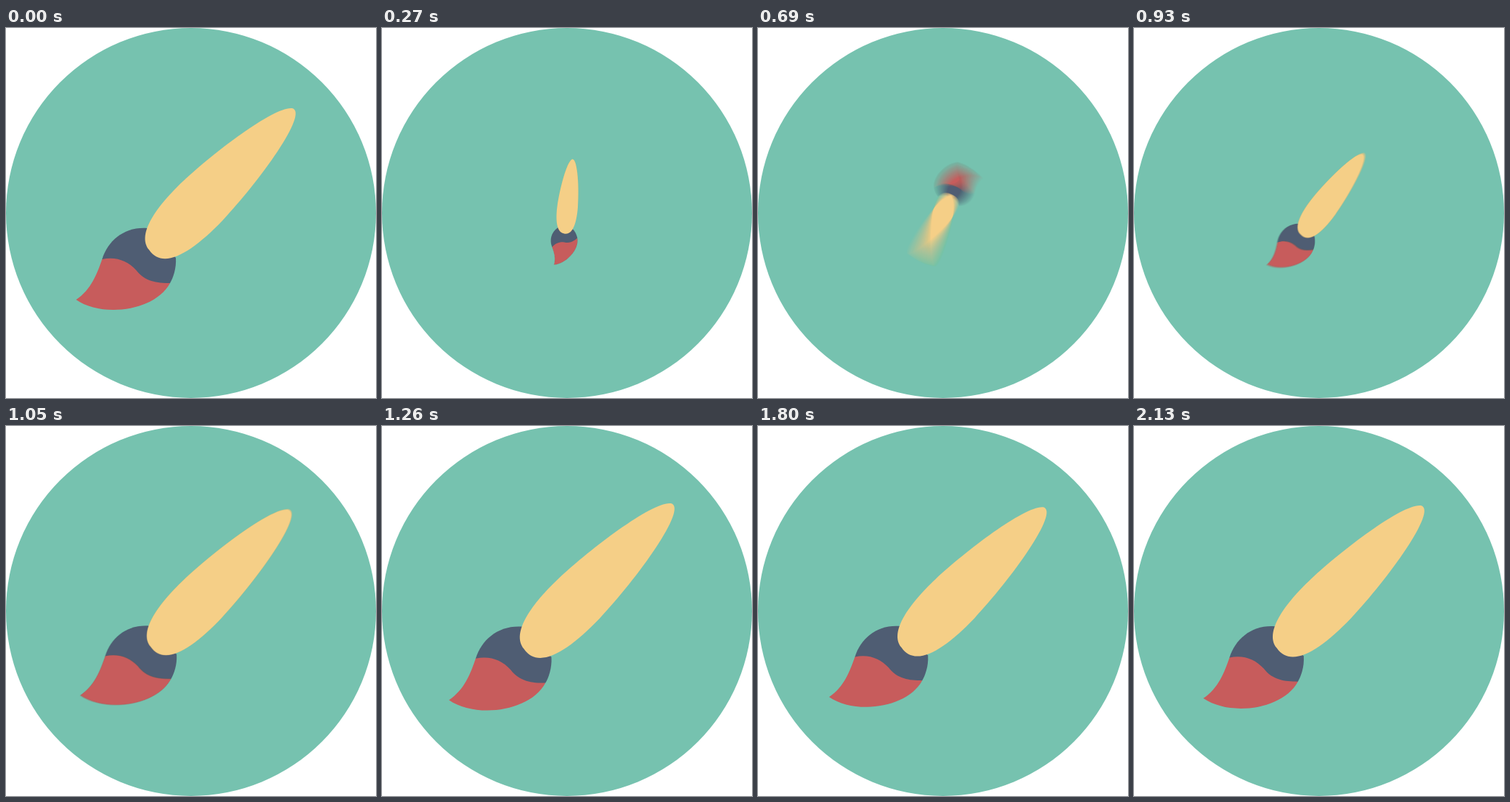
An HTML page with a canvas that plays this animation: 512 by 512 pixels, repeating every 2160 ms.

```html
<!DOCTYPE html>
<html lang="en">
<head>
<meta charset="utf-8">
<title>Paintbrush</title>
<style>
  html, body { margin: 0; width: 100%; height: 100%; overflow: hidden; background: #fff; }
  canvas { display: block; width: 100vmin; height: 100vmin; }
</style>
</head>
<body>
<canvas id="stage" width="512" height="512"></canvas>
<script>
const SIZE = 512, MID = SIZE / 2;
const LOOP = 2160, STEP = 30;
const SHUTTER = 6, SAMPLES = 24;   // motion blur: open time in ms, sub-frames
const SMALL = 0.37, WINDUP = -40;

const parts = [
  ['#4f5d73', 'M133 320C141 294 164 275 195 277L235 318C236 333 231 346 227 353L200 365L150 350Z'],
  ['#c75c5c', 'M97 376C118 362 126 340 133 320C152 316 168 322 180 335C192 351 209 353 227 353C206 392 133 401 97 376Z'],
  ['#f5cf87', 'M396 111C372 108 290 170 245 212C210 245 180 285 198 307C217 335 256 312 300 266C350 213 420 117 396 111Z']
].map(([color, d]) => [color, new Path2D(d)]);

const disc = new Path2D();
disc.arc(MID, MID, MID, 0, Math.PI * 2);

const ctx = document.getElementById('stage').getContext('2d');
const layer = document.createElement('canvas');
layer.width = layer.height = SIZE;
const pen = layer.getContext('2d');

const progress = (t, from, to) => Math.min(1, Math.max(0, (t - from) / (to - from)));
const smooth = u => u * u * (3 - 2 * u);

// Symmetric ease in-out: cubic-bezier(p, 0, 1 - p, 1)
function steep(u, p) {
  let lo = 0, hi = 1;
  for (let i = 0; i < 30; i++) {
    const s = (lo + hi) / 2, r = 1 - s;
    const x = 3 * p * s * r * r + 3 * (1 - p) * s * s * r + s * s * s;
    if (x < u) lo = s; else hi = s;
  }
  return smooth((lo + hi) / 2);
}

function scaleAt(t) {
  if (t > 1080) {
    const sec = (t - 1080) / 1000;
    return 1 + 0.037 * Math.exp(-1.6 * sec) * Math.sin(2 * Math.PI * 1.19 * sec);
  }
  const shrink = smooth(progress(t, 57, 272));
  const grow = smooth(progress(t, 865, 1080));
  return 1 - (1 - SMALL) * (shrink - grow);
}

function angleAt(t) {
  if (t < 300) return WINDUP * smooth(progress(t, 0, 300));
  return WINDUP + (360 - WINDUP) * steep(progress(t, 300, 1080), 0.91);
}

function drawPose(t) {
  pen.setTransform(1, 0, 0, 1, 0, 0);
  pen.fillStyle = '#fff';
  pen.fillRect(0, 0, SIZE, SIZE);
  pen.fillStyle = '#76c2af';
  pen.fill(disc);

  const scale = scaleAt(t);
  pen.translate(MID, MID);
  pen.rotate(angleAt(t) * Math.PI / 180);
  pen.scale(scale, scale);
  pen.translate(-MID, -MID);
  for (const [color, path] of parts) {
    pen.fillStyle = color;
    pen.fill(path);
  }
}

// Running mean of the poses seen while the shutter is open
function render(t) {
  for (let i = 0; i < SAMPLES; i++) {
    drawPose(t + SHUTTER * ((i + 0.5) / SAMPLES - 0.5));
    ctx.globalAlpha = 1 / (i + 1);
    ctx.drawImage(layer, 0, 0);
  }
}

const start = performance.now();
let shown = -1;
function tick() {
  const time = (performance.now() - start) % LOOP;
  const step = Math.floor(time / STEP);
  if (step !== shown) {
    shown = step;
    render(step * STEP);
  }
  requestAnimationFrame(tick);
}
tick();
</script>
</body>
</html>
```
